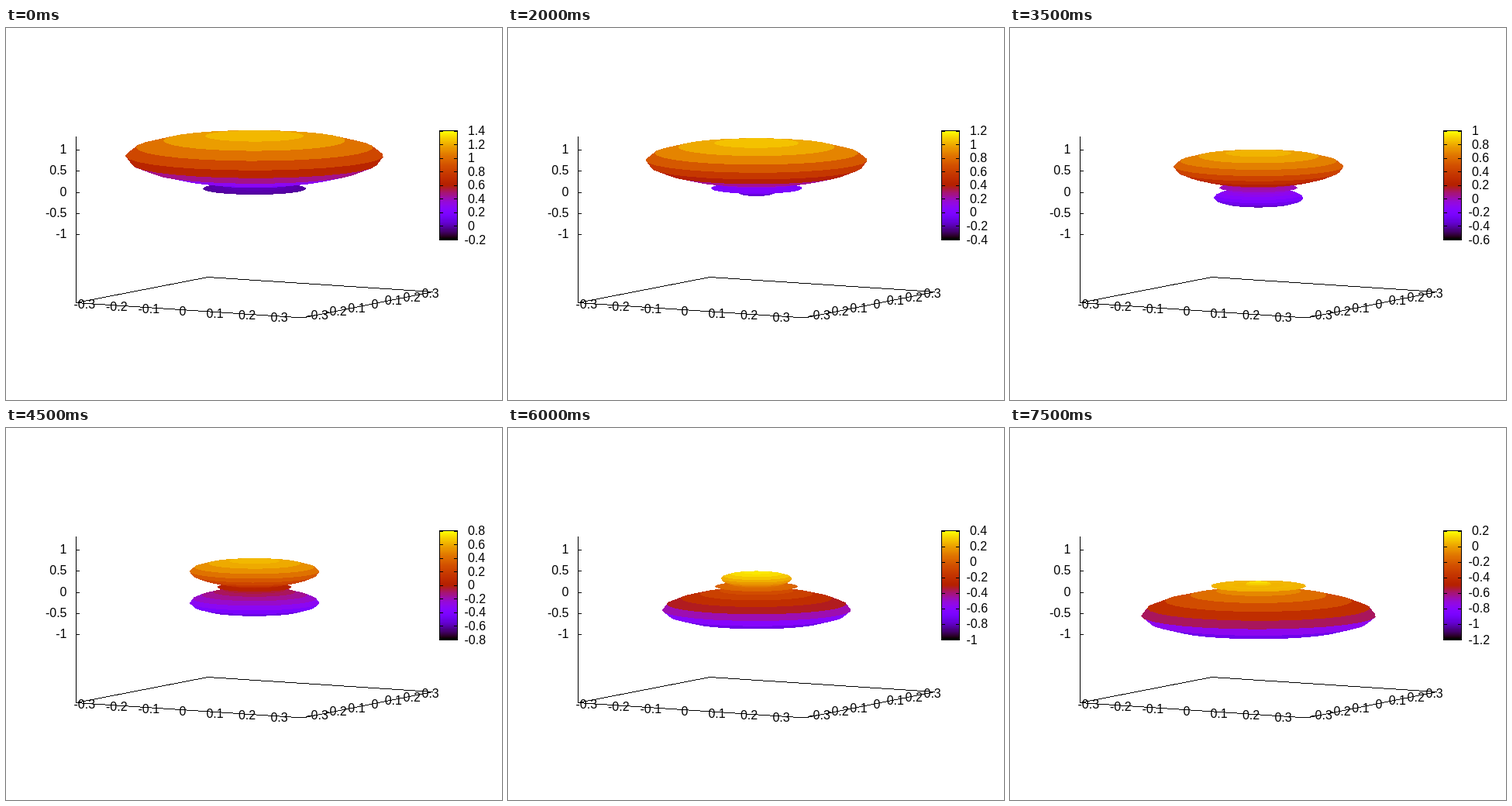
Write an HTML page that moves like this. It is 640 px wide and 480 px high and loops after 8 s.

```html
<!DOCTYPE html>
<html>
<head>
<meta charset="utf-8">
<style>
  html, body { margin: 0; width: 100%; height: 100%; overflow: hidden; background: #fff; }
  svg { display: block; shape-rendering: crispEdges; }
  text { font: 16px "Liberation Sans", Arial, sans-serif; white-space: pre; }
  path { stroke: #000; fill: none; }
</style>
</head>
<body>
<svg width="640" height="480" viewBox="0 0 640 480">
  <g id="axes"></g>
  <g id="scale"></g>
  <g id="surface"></g>
</svg>
<script>
const RAD = Math.PI / 180;
const CX = 320.6, CY = 205.4;      // screen position of the origin
const SIZE = 485, TILT = 0.1139, ZPX = 54.7;
const CELLS = 29;                  // mesh cells in each direction
const COLORS = 128;
const BAR = { x: 559.5, y: 132.5, w: 23, h: 140.5 };

const byId = id => document.getElementById(id);
const line = d => `<path d="${d}"/>`;
const label = (x, y, s, anchor) =>
  `<text x="${x}" y="${y}" text-anchor="${anchor}">${s}</text>`;
const padded = v => (v < 0 ? "" : " ") + v;

function palette(gray) {
  const x = Math.min(COLORS - 1, Math.floor(gray * COLORS)) / (COLORS - 1);
  const rgb = [Math.sqrt(x), x ** 3, Math.max(0, Math.sin(2 * Math.PI * x))];
  return `rgb(${rgb.map(c => Math.round(255 * c))})`;
}

function drawAxes() {
  let out = line("M90.5 140V354.5L260.5 321.5L551 340.5L382.5 374L90.5 354.5");
  for (let i = -2; i <= 2; i++) {
    const y = 211.7 - i / 2 * ZPX;
    out += line(`M90 ${Math.round(y) + 0.5}h5`) + label(78.5, y + 5, i / 2, "end");
  }
  for (let i = 0; i < 7; i++) {
    const s = padded((i - 3) / 10);
    out += label(101.3 + 41.5 * i, 362.3 + 2.8 * i, s, "middle");
    out += label(402 + 23.9 * i, 376 - 4.7 * i, s, "middle");
  }
  for (let i = 0; i < 141; i++)
    out += `<rect x="559" y="${132 + i}" width="24" height="1" fill="${palette(1 - i / 140)}"/>`;
  byId("axes").innerHTML = out;
}

function drawScale(lo, hi) {
  const { x, y, w, h } = BAR;
  let out = line(`M${x} ${y}h${w}v${h}h${-w}z`);
  for (let i = lo; i <= hi; i++) {
    const ty = y + h * (hi - i) / (hi - lo), py = Math.round(ty) + 0.5;
    out += line(`M${x} ${py}h4M${x + w} ${py}h-5`) + label(591.5, ty + 5.5, padded(i / 5), "start");
  }
  byId("scale").innerHTML = out;
}

// |Y10 + Y20 e^(i phase)|^2
function radius(theta, phase) {
  const c = Math.cos(theta);
  const p = Math.sqrt(3 / (4 * Math.PI)) * c;
  const d = Math.sqrt(5 / (16 * Math.PI)) * (3 * c * c - 1);
  return p * p + d * d + 2 * p * d * Math.cos(phase);
}

function project(ring, cell) {
  const a = cell / CELLS * 2 * Math.PI - 30 * RAD;
  const depth = -SIZE * ring.r * Math.sin(a);
  return {
    x: CX + SIZE * ring.r * Math.cos(a),
    y: CY + TILT * depth - ZPX * ring.z,
    depth: depth + 6 * ring.z
  };
}

function drawSurface(phase) {
  const rings = [];
  for (let i = 0; i <= CELLS; i++) {
    const theta = i / CELLS * Math.PI, r = radius(theta, phase);
    rings.push({ r: r * Math.sin(theta), z: r * Math.cos(theta) });
  }
  const zs = rings.map(g => g.z);
  const lo = Math.floor(Math.min(...zs) * 5), hi = Math.ceil(Math.max(...zs) * 5);
  drawScale(lo, hi);

  const quads = [];
  for (let i = 1; i <= CELLS; i++) {
    const a = rings[i - 1], b = rings[i];
    const fill = palette(((a.z + b.z) * 2.5 - lo) / (hi - lo));
    for (let v = 0; v < CELLS; v++) {
      const pts = [project(a, v), project(a, v + 1), project(b, v + 1), project(b, v)];
      quads.push({ pts, fill, depth: pts.reduce((s, p) => s + p.depth, 0) });
    }
  }
  quads.sort((a, b) => a.depth - b.depth);
  byId("surface").innerHTML = quads.map(q =>
    `<polygon fill="${q.fill}" points="${q.pts.map(p => p.x.toFixed(2) + "," + p.y.toFixed(2)).join(" ")}"/>`
  ).join("");
}

let shown = -1;
function tick() {
  const step = Math.floor(performance.now() % 8000 / 500);
  if (step !== shown) {
    shown = step;
    drawSurface((step + 1) * 9 * RAD);
  }
  requestAnimationFrame(tick);
}
drawAxes();
tick();
</script>
</body>
</html>
```
